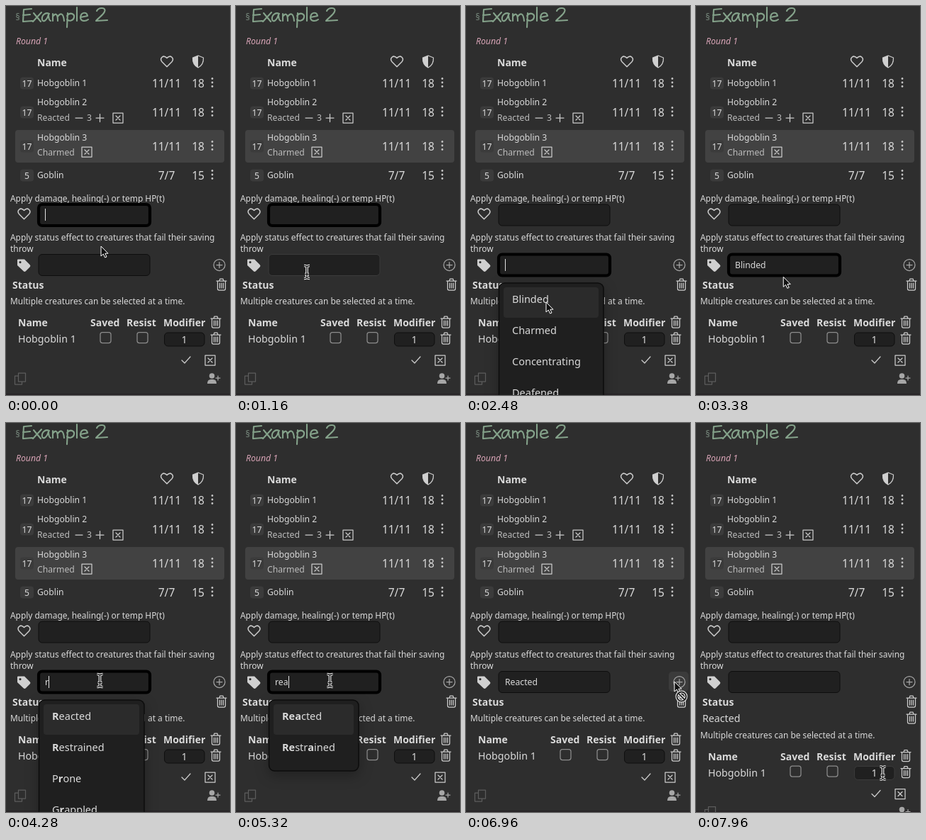
Write an HTML page that moves like this. It is 316 by 549 pixels and loops after 8000 ms.

```html
<!DOCTYPE html>
<html lang="en">
<head>
<meta charset="utf-8">
<title>Encounter tracker</title>
<style>
  html, body { margin: 0; width: 100%; height: 100%; overflow: hidden; background: #2e2e2e; }
  svg { display: block; width: 316px; height: 549px; }
  text { font: 11.93px "Noto Sans", "Open Sans", sans-serif; fill: #dadada; white-space: pre; }
  .b { font-weight: bold; font-size: 14px; }
  .m { font-size: 12.2px; }
  .l { font-size: 14.2px; }
  .n { font-size: 15.5px; text-anchor: middle; }
  .dim { fill: #bdbdbd; }
  .line { fill: none; stroke: #cbcbcb; stroke-width: 1.25; stroke-linecap: round; stroke-linejoin: round; }
  .field { fill: #202020; stroke: #0e0e0e; }
  .field.hover { stroke: #3b3b3b; }
  .field.focus { stroke: #000; stroke-width: 4.2; }
  #menu { filter: drop-shadow(0 6px 9px rgba(0, 0, 0, .27)); }
  #menu text { font-size: 14.5px; }
  #menu tspan { font-weight: bold; }
</style>
</head>
<body>
<svg viewBox="0 0 316 549">
  <defs>
    <path id="heart" class="line" style="stroke-width:1.5" d="M0 7.8L-7.2 .4C-10.500-4-5.5-10 0-4.6C5.5-10 10.500-4 7.2 .4Z"/>
    <path id="trash" class="line" d="M-7-5H7M-3-5L-2-8H2L3-5M-5.5-5V6Q-5.5 8-3.5 8H3.5Q5.5 8 5.5 6V-5M-2.5-2V5M0-2V5M2.5-2V5"/>
    <path id="close" class="line" d="M-7-7H7V7H-7ZM-3-3L3 3M3-3L-3 3"/>
    <g id="dots" fill="#c4c4c4"><circle cy="-5.5" r="1.4"/><circle r="1.4"/><circle cy="5.5" r="1.4"/></g>
    <rect id="box" class="line" x="-7.5" y="-7.5" width="15" height="15" rx="3" style="stroke:#8c8c8c"/>
    <path id="beam" fill="none" d="M-4-9Q0-9 0-7V7Q0 9-4 9M4-9Q0-9 0-7M4 9Q0 9 0 7M-3 3H3"/>
    <g id="ban" fill="none"><circle r="6.5"/><path d="M-4.6-4.6L4.6 4.6"/></g>
  </defs>
  <rect width="316" height="549" fill="#2e2e2e"/>
  <rect y="547" width="316" height="2" fill="#282427"/>

  <text x="13.5" y="20" style="fill:#7b8d80">§</text>
  <path role="img" aria-label="Example 2" class="line" style="stroke:#84a28a;stroke-width:2.1"
    d="M36 4L25 5L24 22L37 21M24 13L34 12M39 10L49 22M50 9L38 22M61 11C55 8 50 14 51 19C52 23 57 22 60 12Q60 20 63 21
       M66 21V11M66 15C70 9 73 11 73 21M73 15C77 9 81 10 82 21M87 10L86 30M86 14C90 8 97 11 96 16C95 21 89 22 86 19
       M100 2V21M105 16L115 14C114 8 106 8 105 16C105 22 112 22 116 19M128 7C131 1 142 2 139 8C137 13 131 16 127 21L143 20"/>
  <text class="m" x="14" y="54" style="font-style:italic;fill:#d8a4b6">Round 1</text>
  <text class="b" x="44" y="85">Name</text>
  <use href="#heart" x="227" y="78"/>
  <path class="line" d="M271 70L278.5 73Q279 83 271 87Q263 83 263.5 73Z"/>
  <path fill="#d0d0d0" d="M271 70V87Q263 83 263.5 73Z"/>

  <rect x="13" y="175" width="295" height="46" rx="4" fill="#424242"/>
  <g id="rows"></g>
  <text class="m dim" x="44" y="162">Reacted</text>
  <path class="line" d="M98 158H108M127 158H138M132.5 152.5V163.5"/>
  <text class="m dim" x="114" y="162">3</text>
  <use href="#close" x="158" y="158"/>
  <text class="m dim" x="44" y="211">Charmed</text>
  <use href="#close" x="114" y="206"/>

  <text x="6" y="276">Apply damage, healing(-) or temp HP(t)</text>
  <use href="#heart" x="25.5" y="293"/>
  <rect id="damage" class="field" x="46" y="280" width="157" height="30" rx="5"/>
  <text x="6" y="331">Apply status effect to creatures that fail their saving</text>
  <text x="6" y="347">throw</text>
  <path fill="#d0d0d0" fill-rule="evenodd" d="M16 358V366L25 374.5Q26.5 375.5 28 374L34 368Q35 366.5 33.5 365L26 357.5H17ZM20 360A1.6 1.6 0 1 1 20 363.2A1.6 1.6 0 1 1 20 360"/>
  <rect id="tag" class="field" x="46" y="350.5" width="157" height="30" rx="5"/>
  <rect id="selection" x="55" y="357" width="46" height="17" fill="#4b5a55"/>
  <text id="typed" class="m" x="55" y="370"></text>
  <rect id="caret" width="1" fill="#e2e2e2" height="17"/>
  <rect id="addHover" x="286" y="351" width="28" height="28" rx="5" fill="#3b3b3b"/>
  <path class="line" style="stroke:#a6a6a6" d="M293 365.5A8 8 0 1 1 309 365.5A8 8 0 1 1 293 365.5M297 365.5H305M301 361.5V369.5"/>

  <text class="b" x="9" y="398.5">Status</text>
  <use href="#trash" x="304" y="393"/>
  <g id="added"><text class="l" x="9" y="422">Reacted</text><use href="#trash" x="304" y="416"/></g>
  <g id="lower">
    <text x="6" y="421">Multiple creatures can be selected at a time.</text>
    <text class="b" x="17" y="452">Name</text>
    <text class="b" x="119" y="452">Saved</text>
    <text class="b" x="170" y="452">Resist</text>
    <text class="b" x="222" y="452">Modifier</text>
    <use href="#trash" x="296" y="446"/>
    <text class="l" x="17" y="475">Hobgoblin 1</text>
    <use href="#box" x="140.5" y="468"/>
    <use href="#box" x="192.5" y="468"/>
    <rect id="modifier" class="field" x="223.5" y="461" width="56.5" height="19" rx="5"/>
    <text class="l" x="247.5" y="475.5">1</text>
    <use href="#trash" x="296" y="469"/>
    <path class="line" d="M248 500L252 504L260 495"/>
    <use href="#close" x="288" y="500"/>
    <path class="line" style="stroke:#5c5c5c" d="M17.5 518H27.5V530H17.5ZM17.5 522H12.5V534H22.5V530"/>
    <g fill="#a6a6a6"><circle cx="290.5" cy="522" r="3.8"/><path d="M284 533Q284 527 289 527H292Q297 527 297 533Z"/></g>
    <path class="line" style="stroke:#a6a6a6" d="M296 525H302M299 522V528"/>
  </g>

  <g id="menu">
    <rect id="panel" x="46.5" y="391" rx="8" fill="#1f1f1f" stroke="#0c0c0c" stroke-width="1.5"/>
    <rect id="active" x="53" y="397" height="43" rx="4" fill="#2b2b2b"/>
    <g id="items"></g>
  </g>

  <g id="pointer">
    <path id="arrow" fill="#111" stroke="#fff" stroke-linejoin="round" d="M0 0V14L3.3 11L5.6 16L8 15L5.8 10.2H10Z"/>
    <g id="ibeam"><use href="#beam" stroke="#fff" stroke-width="3.6"/><use href="#beam" stroke="#111" stroke-width="1.4"/></g>
    <g id="blocked" transform="translate(10 21)"><use href="#ban" stroke="#fff" stroke-width="4"/><use href="#ban" stroke="#222" stroke-width="2"/></g>
  </g>
</svg>
<script>
const $ = id => document.getElementById(id);
const show = (id, on) => { $(id).style.display = on ? '' : 'none'; };
const set = (id, attrs) => { for (const k in attrs) $(id).setAttribute(k, attrs[k]); };
const LOOP = 8000;

const creatures = [
  [17, 'Hobgoblin 1', '11/11', 18, 109, 113],
  [17, 'Hobgoblin 2', '11/11', 18, 150, 140],
  [17, 'Hobgoblin 3', '11/11', 18, 198, 190],
  [5, 'Goblin', '7/7', 15, 239, 243],
];
$('rows').innerHTML = creatures.map(([init, name, hp, ac, y, base]) => `
  <rect x="20" y="${y - 8.5}" width="19" height="17" rx="4" fill="#3b3b3b"/>
  <text class="m" x="29.5" y="${y + 4.5}" text-anchor="middle">${init}</text>
  <text class="m" x="44" y="${base}">${name}</text>
  <text class="n" x="226.5" y="${y + 5.5}">${hp}</text>
  <text class="n" x="271" y="${y + 5.5}">${ac}</text>
  <use href="#dots" x="291" y="${y - 1}"/>`).join('');

// start, end, number of steps, destination
const moves = [
  [130, 1160, 8, 100, 375.5], [1900, 2190, 3, 113, 418], [3080, 3080, 1, 120, 389],
  [3380, 3680, 3, 132.5, 363.5], [5470, 5920, 4, 113, 418], [6360, 6810, 4, 294, 365],
  [7410, 7960, 5, 263.5, 494],
];

function pointerAt(t) {
  let x = 134, y = 339;
  for (const [start, end, steps, toX, toY] of moves) {
    if (t < start) break;
    const gap = (end - start) / (steps - 1 || 1) || 1;
    const p = Math.min(1, (Math.floor((t - start) / gap + 1e-6) + 1) / steps);
    const ease = p * p * (3 - 2 * p);
    x += (toX - x) * ease;
    y += (toY - y) * ease;
  }
  return [x, y];
}

const latest = (track, t) => track.filter(([start]) => t >= start).pop()[1];

const typing = [[0, ''], [2630, 'Blinded'], [4280, 'r'], [4880, 're'], [5320, 'rea'], [6070, 'Reacted'], [7110, '']];
const caretOn = [[0, 1], [130, 0], [660, 1], [1160, 0], [1460, 1], [1900, 0], [2480, 1], [3080, 0],
  [3530, 1], [3980, 0], [4280, 1], [5770, 0], [6070, 1], [6660, 0]];

const matches = ['Reacted', 'Restrained', 'Prone', 'Grappled'];
const menu = (words, query, right) => ({ words, query, right });
const menus = [
  [0, null],
  [1600, menu(['Blinded', 'Charmed', 'Concentrating', 'Deafened'], '', 194)],
  [2630, null],
  [4280, menu(matches, 'r', 195)],
  [5020, menu(matches, 're', 173)],
  [5320, menu(matches.slice(0, 2), 'rea', 173)],
  [6070, null],
];

// Emphasise the query letters in the order they occur
function emphasise(word, query) {
  let next = 0;
  return [...word].map(c =>
    c.toLowerCase() === query[next] ? (next++, `<tspan>${c}</tspan>`) : c).join('');
}

let openMenu;
function drawMenu(state) {
  if (state === openMenu) return;
  openMenu = state;
  show('menu', state);
  if (!state) return;
  const { words, query, right } = state;
  set('panel', { width: right - 46.5, height: words.length > 2 ? 190 : 100 });
  set('active', { width: right - 60 });
  $('items').innerHTML = words.map((word, i) =>
    `<text x="65" y="${419 + 44 * i}">${emphasise(word, query)}</text>`).join('');
}

function render(t) {
  const [x, y] = pointerAt(t);
  const added = t >= 7110;
  const shift = added ? 23.5 : 0;
  const over = (x0, y0, x1, y1) => x >= x0 && x <= x1 && y >= y0 && y <= y1;
  const overTag = over(46, 351, 203, 380);
  const overModifier = over(223, 461 + shift, 280, 480 + shift);
  const overAdd = over(286, 351, 314, 379);
  const onDamage = t < 1460, onTag = !onDamage && t < 6960;

  set('damage', { class: 'field' + (onDamage ? ' focus' : '') });
  set('tag', { class: 'field' + (onTag ? ' focus' : overTag ? ' hover' : '') });
  set('modifier', { class: 'field' + (overModifier ? ' hover' : '') });

  const text = latest(typing, t);
  if ($('typed').textContent !== text) $('typed').textContent = text;
  show('selection', t >= 3980 && t < 4280);
  show('caret', (onDamage || onTag) && latest(caretOn, t));
  set('caret', { x: Math.round(55.4 + (text ? $('typed').getComputedTextLength() : 0)), y: onDamage ? 286 : 357 });
  drawMenu(latest(menus, t));

  show('added', added);
  set('lower', { transform: `translate(0 ${shift})` });
  show('addHover', overAdd);
  show('ibeam', overTag || overModifier);
  show('arrow', !overTag && !overModifier);
  show('blocked', overAdd);
  set('pointer', { transform: `translate(${x} ${y})` });
}

function tick() {
  render(performance.now() % LOOP);
  requestAnimationFrame(tick);
}
tick();
</script>
</body>
</html>
```
